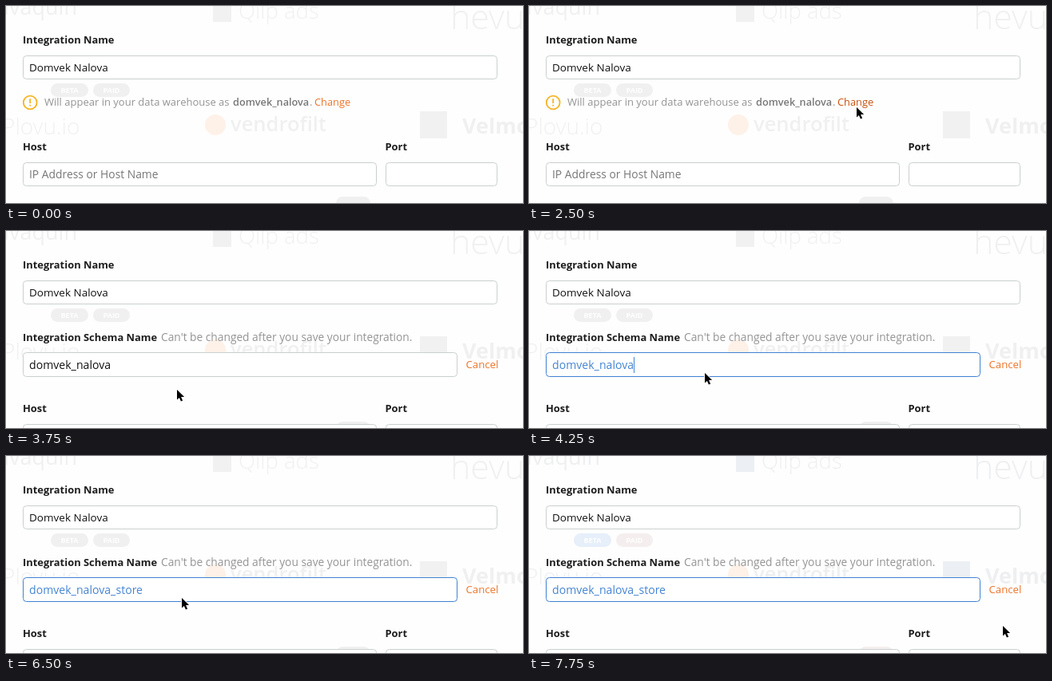
An HTML page that plays this animation: 647x247 px, repeating every 8 s.

```html
<!DOCTYPE html>
<html lang="en">
<head>
<meta charset="utf-8">
<title>Integration form</title>
<style>
  html, body { margin: 0; width: 100%; height: 100%; overflow: hidden; background: #fefefe; }
  svg { display: block; width: 647px; height: 247px; font: 13px "Open Sans", "Noto Sans", sans-serif; }
  text { white-space: pre; }
  .logos { --ghost: #f0f0f0; --mark: #f1f1f1; --beta: #f0f0f0; --plan: #f0f0f0; fill: var(--ghost); }
  .logos.tinted { --ghost: #eeeff1; --mark: #eceff4; --beta: #e6effa; --plan: #f4efee; }
  .mark { fill: var(--mark); }
  .beta { fill: var(--beta); }
  .plan { fill: var(--plan); }
  .thin { font-weight: 300; }
  .tag { fill: #fefefe; font-size: 9px; font-weight: 700; text-anchor: middle; }
  .label { font-size: 12.9px; font-weight: 700; fill: #1d1d1d; }
  .box { fill: #fff; stroke: #c9d0ce; }
  .value { font-size: 13.5px; fill: #111; }
  .hint { fill: #777; font-size: 13.85px; }
  .note { fill: #949494; }
  .link { fill: #ee7429; }
  .link.hover { fill: #c9510c; }
  #schema { font-size: 14.1px; }
  .focus .box { stroke: #3f82d3; }
  .focus .value { fill: #4484d2; }
  #caret { fill: #3f82d3; }
</style>
</head>
<body>
<svg viewBox="0 0 647 247">
  <g id="logos" class="logos">
    <text x="89" y="11" font-size="27" text-anchor="end">Selvaquin</text>
    <rect class="mark" x="259" y="-3" width="23" height="23"/>
    <text class="thin" x="291" y="16" font-size="27.5">Qilp ads</text>
    <text class="thin" x="556" y="29" font-size="43">hevund</text>
    <text class="thin" x="-5" y="161" font-size="28">Plovu.io</text>
    <circle cx="262" cy="149" r="13" fill="#fef1e8"/>
    <text x="281" y="157" font-size="25.5" font-weight="600">vendrofilt</text>
    <rect class="mark" x="518" y="132" width="34" height="34"/>
    <text x="571" y="160" font-size="27" font-weight="700">Velmora</text>
    <rect class="beta" x="56" y="97" width="47" height="17" rx="8.5"/>
    <rect class="plan" x="109" y="97" width="46" height="17" rx="8.5"/>
    <rect class="plan" x="413" y="239" width="43" height="17" rx="8.5"/>
    <text class="tag" x="79.5" y="109">BETA</text>
    <text class="tag" x="132" y="109">PAID</text>
  </g>

  <text class="label" x="21" y="47">Integration Name</text>
  <rect class="box" x="21.5" y="62.5" width="593" height="29" rx="4"/>
  <text class="value" x="29" y="82">Domvek Nalova</text>

  <g id="notice">
    <circle cx="30.2" cy="121" r="8.4" fill="none" stroke="#f6b426" stroke-width="1.8"/>
    <path d="M30.2 116.3v5.6m0 1.8v1.9" stroke="#f6b426" stroke-width="1.9"/>
    <text class="note" x="48" y="125">Will appear in your data warehouse as</text>
    <text x="284" y="125" font-size="12.7" font-weight="600" fill="#777">domvek_nalova</text>
    <text class="note" x="380" y="125">.</text>
    <text id="change" class="link" x="386" y="125" font-size="12.8">Change</text>
  </g>

  <g id="editor">
    <text class="label" x="21" y="138">Integration Schema Name</text>
    <text class="note" x="194" y="138" font-size="13.75">Can't be changed after you save your integration.</text>
    <rect class="box" x="21.5" y="152.5" width="543" height="30" rx="4"/>
    <text id="schema" class="value" x="29" y="173"></text>
    <rect id="caret" y="158" width="1" height="20"/>
    <text class="link" x="575.5" y="172" font-size="13.2">Cancel</text>
  </g>

  <g id="server">
    <text class="label" x="21" y="181">Host</text>
    <text class="label" x="474.5" y="181">Port</text>
    <rect class="box" x="21.5" y="196.5" width="442" height="29" rx="4"/>
    <rect class="box" x="475.5" y="196.5" width="139" height="29" rx="4"/>
    <text class="hint" x="29" y="216">IP Address or Host Name</text>
  </g>

  <path id="pointer" d="M0 0V12.6L2.9 9.9 4.9 14.6 7.1 13.7 5.1 9.1H9.1Z"
        fill="#000" stroke="#fff" stroke-width="1.8" paint-order="stroke"/>
</svg>
<script>
  const LOOP = 8000;
  const $ = id => document.getElementById(id);
  const show = (el, on) => el.setAttribute('visibility', on ? 'visible' : 'hidden');

  // Each track is a list of [start time, value]; values hold until the next start.
  const pointerTrack = [
    [0, null], [750, [555, 96]], [1000, [496, 136]], [1250, null],
    [1750, [582, 189]], [2000, [427, 154]], [2250, [410, 131]], [2500, [410, 127]],
    [3750, [214, 199]], [4000, [220, 178]], [7000, [222, 178]],
    [7250, [374, 224]], [7500, [581, 213]], [7750, [593, 213]]
  ];
  const suffixTrack = [[0, ''], [5250, '_'], [5500, '_s'], [5750, '_sto'], [6000, '_store']];
  const caretTrack = [[0, 0], [4250, 1], [4750, 0], [5250, 1], [6500, 0], [7000, 1], [7500, 0]];

  function at(track, t) {
    let value;
    for (const [start, v] of track) if (t >= start) value = v;
    return value;
  }

  function render(t) {
    const editing = t >= 3000;
    show($('notice'), !editing);
    show($('editor'), editing);
    $('server').setAttribute('transform', `translate(0 ${editing ? 46 : 0})`);
    $('change').classList.toggle('hover', t >= 2250);
    $('editor').classList.toggle('focus', t >= 4250);
    $('logos').classList.toggle('tinted', t >= 7500);

    const schema = $('schema');
    schema.textContent = 'domvek_nalova' + at(suffixTrack, t);
    $('caret').setAttribute('x', Math.round(29 + schema.getComputedTextLength()));
    show($('caret'), editing && at(caretTrack, t));

    const tip = at(pointerTrack, t);
    show($('pointer'), tip);
    if (tip) $('pointer').setAttribute('transform', `translate(${tip})`);
  }

  function tick() {
    render(performance.now() % LOOP);
    requestAnimationFrame(tick);
  }
  tick();
</script>
</body>
</html>
```
